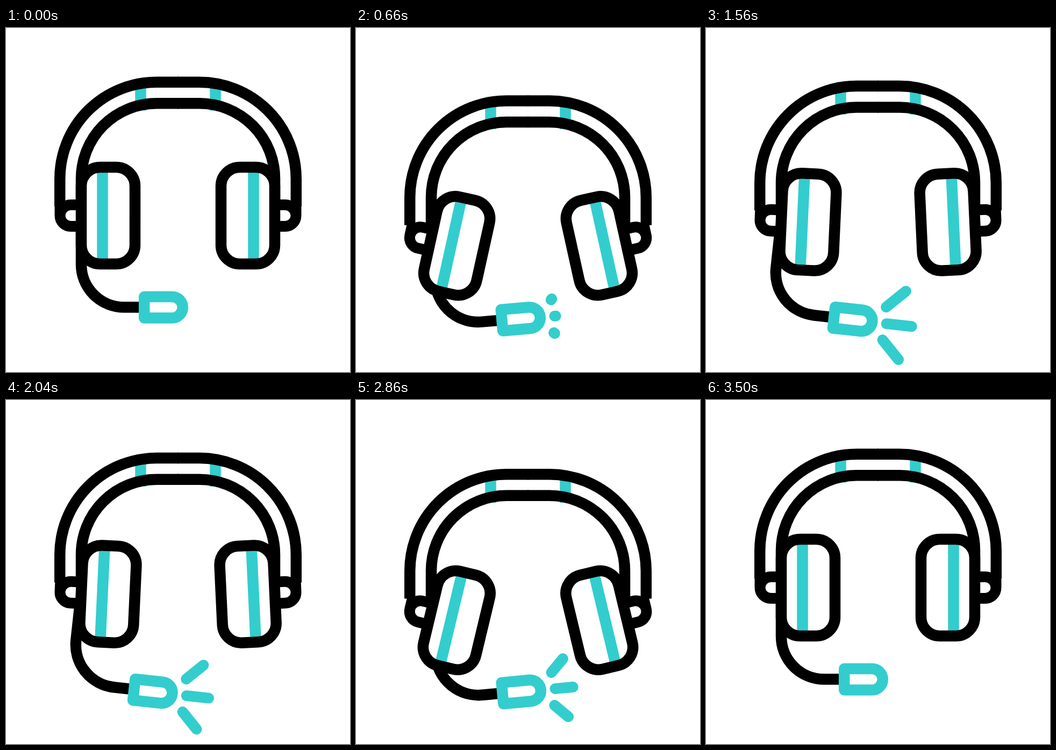
Animation of 640 by 640 pixels, one loop 3.6 s. Source, as an HTML page:

```html
<!DOCTYPE html>
<html lang="en">
<head>
<meta charset="utf-8">
<title>Headset</title>
<style>
  html, body { margin: 0; width: 100%; height: 100%; overflow: hidden; background: #fff; }
  svg { display: block; width: 100vw; height: 100vh; }
  .line { fill: none; stroke: #000; stroke-width: 20.5; }
  .teal { fill: none; stroke: #33cdcd; stroke-width: 20.5; }
  .thin { stroke-width: 20; }
</style>
</head>
<body>
<svg viewBox="0 0 640 640">
  <defs>
    <g id="side">
      <path class="teal" d="M250.5 104V153.5"/>
      <g class="tilt">
        <path class="line thin" d="M142 329H120.5A20 20 0 0 0 120.5 369H142M100.5 325V349"/>
      </g>
      <path class="line" d="M100.2 332V281A180 180 0 0 1 280 100.7H321M140 332V281A140 140 0 0 1 280 140.3H321"/>
      <g class="tilt">
        <rect x="140" y="259" width="100" height="180" rx="35" fill="#fff"/>
        <path class="teal" d="M179.5 262V436"/>
        <rect class="line" x="140" y="259" width="100" height="180" rx="35"/>
      </g>
    </g>
  </defs>
  <g id="all">
    <g id="boom">
      <path class="line" d="M140 370V440A80 79.5 0 0 0 220 519.5H252"/>
      <path class="teal" stroke-linejoin="round" d="M257.2 500H309A19.8 19.8 0 0 1 309 539.6H257.2Z"/>
      <path id="rays" class="teal thin" stroke-linecap="round"/>
    </g>
    <use href="#side"/>
    <use href="#side" transform="translate(640 0) scale(-1 1)"/>
  </g>
</svg>
<script>
const LOOP = 3600, HALF = 900, LAST = 790;   // ms: loop, one dip or rise, final rise
const PEAK = 3 * HALF;                       // second and last low point
const FULL = 1080, PULSE = 540;              // rays first fully out, pulse period

const $ = id => document.getElementById(id);
const tilts = document.querySelectorAll('.tilt');

const clamp = (x, lo, hi) => Math.min(hi, Math.max(lo, x));
const ease = x => {
  x = clamp(x, 0, 1);
  return x * x * (3 - 2 * x);
};

// 0 = headset up, 1 = headset down
function dip(t) {
  const p = t < PEAK ? t / HALF : 3 + Math.min(1, (t - PEAK) / LAST);
  return ease(1 - Math.abs(p % 2 - 1));
}

// the boom swings outwards only on the middle rise
function swing(t, u) {
  const out = t > HALF && t < PEAK ? 8.8 : 0;
  return out - (6 + out) * u;
}

function reach(t) {
  const beat = Math.cos(2 * Math.PI * (clamp(t, FULL, PEAK) - FULL) / PULSE);
  return ease((t - 600) / 480) * ease((PEAK + 420 - t) / 420) * (39.5 + 10 * beat);
}

function rayPath(len) {
  if (len < 0.5) return '';
  return [-1, 0, 1].map(i => {
    const a = i * Math.PI / 4;
    const x = i ? 351.5 : 355.5, y = 520.5 + 30.7 * i;
    return `M${x} ${y}l${len * Math.cos(a)} ${len * Math.sin(a)}`;
  }).join('');
}

function draw(t) {
  const u = dip(t);
  $('all').setAttribute('transform', `translate(0 ${42 * u})`);
  tilts.forEach(g => g.setAttribute('transform', `rotate(${15.1 * u} 90 349)`));
  $('boom').setAttribute('transform', `rotate(${swing(t, u)} 140 350)`);
  $('rays').setAttribute('d', rayPath(reach(t)));
}

const start = performance.now();
function tick() {
  draw((performance.now() - start) % LOOP);
  requestAnimationFrame(tick);
}
draw(0);
requestAnimationFrame(tick);
</script>
</body>
</html>
```
